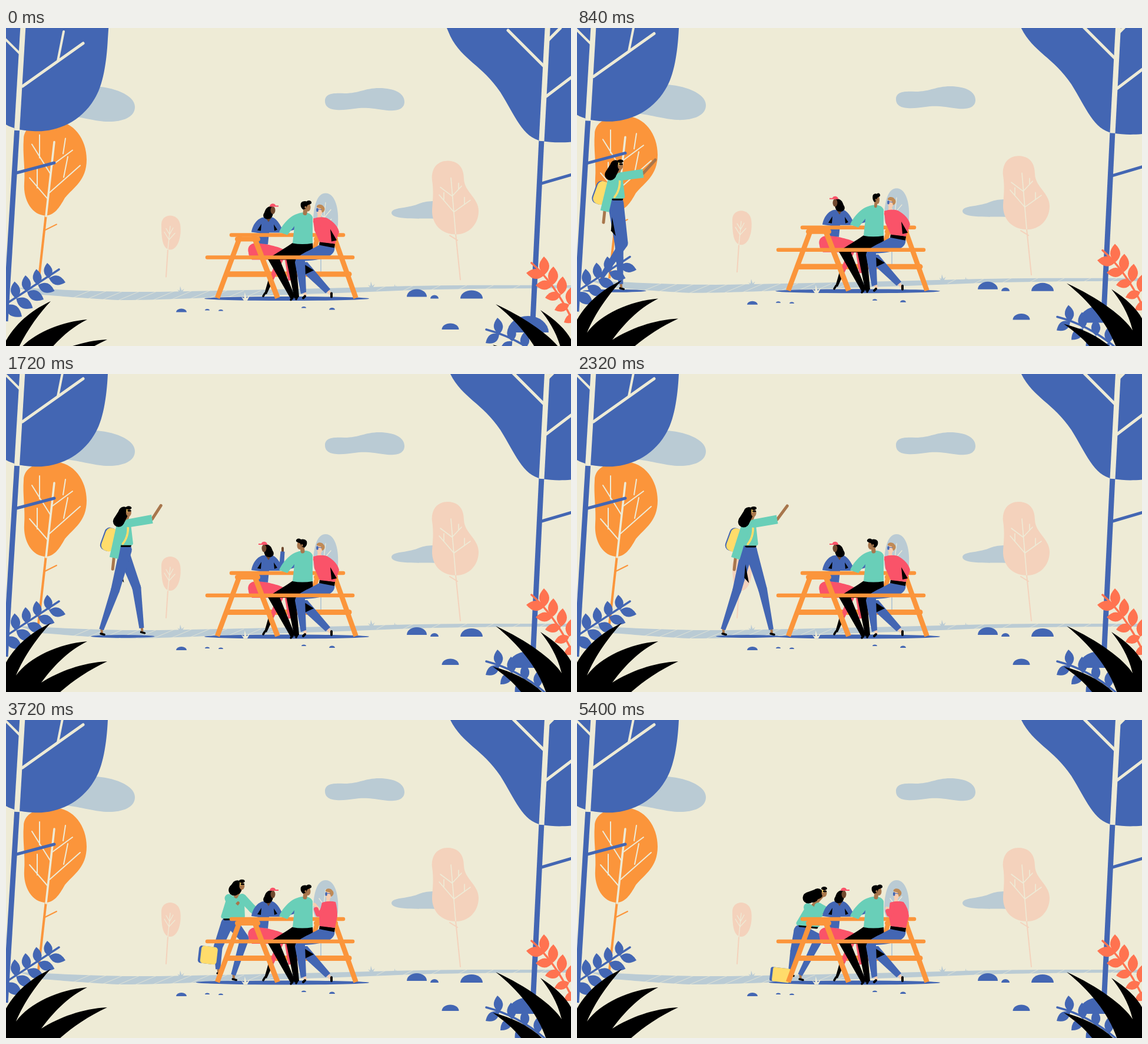
Animation of 960 by 540 pixels, one loop 5440 ms. Source, as an HTML page with a canvas:

```html
<!DOCTYPE html>
<html lang="en">
<head>
<meta charset="utf-8">
<title>Picnic table</title>
<style>
html, body { margin: 0; width: 100%; height: 100%; overflow: hidden; background: #eeebd6; }
canvas { display: block; }
</style>
</head>
<body>
<canvas id="stage" width="960" height="540"></canvas>
<script>
const g = document.getElementById('stage').getContext('2d');
const LOOP = 5440, PI = Math.PI;
const CREAM = '#eeebd6', BLUE = '#4366b3', SKY = '#bacbd4', ORANGE = '#fb953b', PEACH = '#f4d2bc',
  TEAL = '#69cfb8', RED = '#fa5369', CORAL = '#ff7350', YELLOW = '#ffdc6b', BLACK = '#000',
  TAN = '#a8764c', BROWN = '#70492f', PALE = '#f8cdb0', HAIR = '#c08a55';
let t = 0;

const mix = (a, b, k) => a + (b - a) * k;
const mixPt = (p, q, k) => [mix(p[0], q[0], k), mix(p[1], q[1], k)];
const ramp = (a, b) => { // smooth 0..1 between two times
  const k = Math.min(1, Math.max(0, (t - a) / (b - a)));
  return k * k * (3 - 2 * k);
};

function shape(d, color) {
  g.fillStyle = color;
  g.fill(new Path2D(d));
}
function line(d, color, width, cap = 'round') {
  g.strokeStyle = color;
  g.lineWidth = width;
  g.lineCap = cap;
  g.lineJoin = 'round';
  g.stroke(new Path2D(d));
}
function oval(x, y, rx, ry, color) {
  g.fillStyle = color;
  g.beginPath();
  g.ellipse(x, y, rx, ry, 0, 0, 2 * PI);
  g.fill();
}
function dome(x, y, rx, ry) {
  g.fillStyle = BLUE;
  g.beginPath();
  g.ellipse(x, y, rx, ry, 0, PI, 2 * PI);
  g.fill();
}
function limb([x1, y1], [x2, y2], w1, w2, color) { // tapered, round at its start
  const d = Math.hypot(x2 - x1, y2 - y1) || 1, nx = (y1 - y2) / d / 2, ny = (x2 - x1) / d / 2;
  oval(x1, y1, w1 / 2, w1 / 2, color);
  shape(`M${x1 + nx * w1} ${y1 + ny * w1}L${x2 + nx * w2} ${y2 + ny * w2}
    L${x2 - nx * w2} ${y2 - ny * w2}L${x1 - nx * w1} ${y1 - ny * w1}Z`, color);
}
function leaf(x1, y1, x2, y2, color) {
  const mx = mix(x1, x2, .45), my = mix(y1, y2, .45), nx = (y2 - y1) * .55, ny = (x1 - x2) * .55;
  shape(`M${x1} ${y1}Q${mx + nx} ${my + ny} ${x2} ${y2}Q${mx - nx} ${my - ny} ${x1} ${y1}Z`, color);
}
function layer(shift, power, draw) { // camera settles upwards, nearer layers move further
  g.save();
  g.translate(0, shift * Math.max(0, 1 - t / 1800) ** power);
  draw();
  g.restore();
}
function tuft(x, y, size, color) {
  for (const [dx, dy] of [[-.8, .7], [-.15, 1.5], [.8, .9]])
    shape(`M${x - size * .35} ${y}L${x + dx * size} ${y - dy * size}L${x + size * .35} ${y}Z`, color);
}

function clouds() {
  shape('M100 145L150 96C180 97 219 110 219 131C219 150 195 157 170 156C148 155 130 148 100 145Z', SKY);
  shape('M542 121C542 108 556 107 575 108C600 108 610 99 634 99C660 99 677 108 677 122C677 135 665 138 648 137C625 134 610 131 592 134C570 137 542 140 542 121Z', SKY);
  shape('M655 311C656 301 680 304 700 296C715 290 725 291 735 291V321C700 320 655 323 655 311Z', SKY);
}

function path() {
  shape('M20 428C80 430 150 436 260 435C400 432 520 430 620 427C740 423 850 424 960 424V429C850 429 760 430 690 432C600 436 480 440 380 443C300 447 250 449 190 449C130 446 90 442 60 440Z', SKY);
  for (let i = 0; i < 12; i++) {
    const x = 105 + i * 29;
    line(`M${x} 449L${x + 38} 433`, CREAM, .7);
  }
  for (let x = 630; x < 950; x += 45) line(`M${x} 433l18 -9`, CREAM, .7);
  tuft(297, 436, 7, SKY);
  tuft(621, 428, 7, SKY);
  tuft(661, 428, 4, SKY);
}

function farTrees() {
  shape('M264 325C264 306 292 304 296 325C299 345 292 368 279 368C266 367 264 350 264 325Z', PEACH);
  line('M275 368L272 414', PEACH, 2);
  line('M279 328L275 368M269 338L277 351L287 340M272 332L278 342L284 331', CREAM, 1.3);

  shape('M724 250C722 228 735 216 752 217C770 218 778 230 778 248C779 270 803 280 803 302C803 325 786 342 765 342C740 342 723 325 724 300C725 285 727 270 724 250Z', PEACH);
  line('M764 341L772 419M767 352L754 344', PEACH, 2);
  line('M756 246L764 341M736 275L761 304L789 284M738 262L758 277L774 260M744 283V271M779 291V279M769 265V255', CREAM, 1.6);

  shape('M543 272C560 272 566 300 564 325C562 350 520 350 522 318C523 295 528 272 543 272Z', SKY);
  line('M535 345V408', SKY, 2);
  line('M543 288L537 340M532 303L540 314L552 300M529 318L539 328L553 316', CREAM, 1.3);

  shape('M30 180C30 158 55 148 82 149C115 150 137 180 137 215C137 250 115 262 100 280C90 298 82 309 68 310C45 310 29 285 31 255C33 230 28 205 30 180Z', ORANGE);
  line('M68 308L55 425', ORANGE, 4, 'butt');
  line('M66 335L86 325', ORANGE, 2);
  line('M82 185L68 311', CREAM, 3.5);
  line('M44 189L76 240M57 173V212M101 179L97 205M113 199L79 224M126 225L74 271M105 210L98 245M40 246L71 282M53 228V263', CREAM, 2);
}

function leftTree() {
  line('M19 150L-1 480', BLUE, 9, 'butt');
  line('M18 228L82 211', BLUE, 5);
  shape('M0 -30H175L173 0C171 40 165 80 150 103C125 145 80 160 45 157C25 156 10 152 0 146Z', BLUE);
  line('M29.5 -30L18.5 156', CREAM, 9, 'butt');
  line('M-8 -6L24 26M98 -12L88 38', CREAM, 4);
  line('M131 8L28 81', CREAM, 5);
}

function rightTree() {
  line('M910 175L895 485', BLUE, 9, 'butt');
  line('M910 250L968 233', BLUE, 5);
  shape('M742 -30L755 0C775 40 810 50 840 95C865 135 878 172 910 178C930 181 945 181 965 179V-30Z', BLUE);
  line('M921 -30L910 178', CREAM, 9, 'butt');
  line('M853 -10L914 51M968 64L918 102M942 -14L918 10', CREAM, 5);
}

function rocks() {
  for (const [x, y, rx, ry] of [[698, 443, 17, 13], [728, 446, 7, 6], [791, 446, 19, 14],
    [298, 469, 9, 6], [342, 466, 4, 2.5], [365, 467, 4, 2.5], [506, 462, 4, 2.5], [554, 465, 5, 3.5]]) dome(x, y, rx, ry);
}
function nearRocks() {
  dome(755, 494, 14.5, 10.5);
  dome(887, 499, 35, 28);
}

function plants() {
  line('M90 386L-5 448', BLUE, 3.5);
  for (let i = 0; i < 5; i++) {
    const x = 73 - i * 18.5, y = 401 + i * 11.5;
    leaf(x, y, x - 3, y - 26 - i, BLUE);
    leaf(x, y, x + 28, y + 7 + i * 3, BLUE);
  }
  line('M893 375Q935 412 966 480', CORAL, 3.5);
  for (let i = 0; i < 5; i++) {
    const x = 915 + i * 14, y = 395 + i * 17;
    leaf(x, y, x - 1 + i * 2, y - 31, CORAL);
    leaf(x, y, x - 31 + i * 2, y - 3 + i * 4, CORAL);
  }
  line('M816 488Q870 502 915 540', BLUE, 3.5);
  for (let i = 0; i < 4; i++) {
    const x = 838 + i * 22, y = 496 + i * 12;
    leaf(x, y, x - 3 + i, y - 28, BLUE);
    leaf(x, y, x - 23 + i * 3, y + 15 + i * 4, BLUE);
  }
}

function blades() {
  shape('M0 490C20 455 50 435 76 423C55 445 30 480 17 512C40 480 90 458 138 454C110 468 85 490 60 524C90 505 130 490 172 488C140 503 115 520 92 540H0Z', BLACK);
  shape('M832 428C885 452 930 485 944 508C937 478 922 455 908 438C935 455 955 475 962 492V545H919C905 500 872 460 832 428Z', BLACK);
  shape('M827 497C860 505 890 520 912 541H876C862 523 845 510 827 497Z', BLACK);
}

// Joints: head, shoulders, hems, back arm, front arm, back leg, front leg, bag, hair end, face, bag size, [bag tilt, sleeve]
const STAND = [[358, 251], [349, 269], [382, 269], [353, 309], [388, 301], [334, 300], [343, 275], [398, 306], [395, 334],
  [369, 318], [339, 371], [354, 417], [386, 316], [393, 372], [402, 433], [340, 326], [376, 260], [359, 255], [23, 42], [.1, .65]];
const SIT = [[409, 295], [392, 318], [410, 317], [376, 345], [409, 348], [410, 330], [418, 327], [428, 327], [446, 333],
  [379, 358], [370, 392], [363, 426], [384, 360], [411, 371], [379, 433], [347, 433], [393, 302], [420, 294], [30, 24], [.12, .75]];

function stride(p) { // foot offset: planted half, then swung forward
  if (p < .5) return [41 - 164 * p, 0];
  const u = p * 2 - 1;
  return [-41 + 82 * u ** 1.4, -12 * Math.sin(PI * u)];
}
function knee(hip, foot, lift) {
  const dx = foot[0] - hip[0], dy = foot[1] - hip[1], d = Math.hypot(dx, dy), bend = 3 + 2 * lift;
  return [hip[0] + dx / 2 + dy / d * bend, hip[1] + dy / 2 - dx / d * bend];
}
function walkPose() {
  const x = 289 + (t - 2320) * .153;
  const p = ((t - 1200) / 1120 + 2) % 1, y = 293 - 3 * Math.abs(Math.sin(2 * PI * p));
  const at = (dx, dy) => [x + dx, y + dy];
  const leg = (hip, q) => {
    const [dx, dy] = stride(q % 1), foot = [x + dx, 434 + dy];
    return [hip, knee(hip, foot, -dy), foot];
  };
  const up = ramp(520, 900), swing = 5 * Math.sin(4 * PI * p) * up, arm = 3 * Math.cos(2 * PI * p);
  return [at(3, -58), at(-2, -38), at(11, -39), at(-4, -5), at(15, -5), at(-17 - arm, 20), at(-19 - arm, 39),
    mixPt(at(30, -20), at(51, -46), up), mixPt(at(51, -41), at(68 + swing, -69), up),
    ...leg(at(0, 6), p + .5), ...leg(at(6, 6), p),
    at(-21, -11), at(-6, -42), at(11, -57), [22, 40], [.35, 0]];
}

function leg(hip, kn, foot) {
  limb(hip, kn, 21, 15, BLUE);
  shin(kn, foot);
}
function shin(kn, foot) {
  const [x, y] = foot;
  limb([x, y - 4], [x + 1, y + 6], 4, 4, TAN);
  line(`M${x - 1} ${y + 7}L${x + 5} ${y + 8.5}`, BLACK, 3.5);
  limb(kn, foot, 15, 8, BLUE);
}
function sleeve(sh, el, hand, cover, w) {
  line(`M${el}L${hand}`, TAN, 5);
  limb(sh, el, 14, w, TEAL);
  if (cover > .05) limb(el, mixPt(el, hand, cover), w, 11, TEAL);
}

function newcomer([head, sB, sF, hB, hF, eB, handB, eF, handF, hipB, kB, fB, hipF, kF, fF, bag, lobe, face, size, [tilt, cover]]) {
  const walking = cover < .3;
  if (!walking && t < 3650) line(`M${handB}L${bag[0]} ${bag[1] - 15}`, YELLOW, 4);
  leg(hipB, kB, fB);
  if (walking) shape(`M${hipB[0] - 3} ${hipB[1] + 24}l6 32l-8 -9Z`, BLACK);
  leg(hipF, kF, fF);
  g.save();
  g.translate(...bag);
  g.rotate(tilt);
  const [w, h] = size;
  for (const [dx, c] of [[walking ? -2 : -4, BLUE], [0, YELLOW]]) {
    g.fillStyle = c;
    g.beginPath();
    g.roundRect(dx - w / 2, -h / 2, w, h, mix(9, 3, ramp(3400, 3900)));
    g.fill();
  }
  g.restore();
  line(`M${hB[0] + 3} ${hB[1] + 4}L${hF[0] - 2} ${hF[1] + 4}`, BLACK, 5);
  const body = `M${sB}L${sF}L${hF}L${hB}Z`;
  shape(body, TEAL);
  line(body, TEAL, 7);
  line(`M${face}L${(sB[0] + sF[0]) / 2 + 1} ${(sB[1] + sF[1]) / 2 - 3}`, TAN, 7);
  if (walking) line(`M${sF[0] - 2} ${sF[1] - 3}Q${sF[0] + 2} ${sF[1] + 20} ${hB[0] + 5} ${hB[1] + 1}`, YELLOW, 3.5);
  const cuff = mix(15, 13, cover);
  sleeve(sB, eB, handB, cover, cuff);
  sleeve(sF, eF, handF, cover, cuff);
  limb(lobe, head, 19, 17, BLACK);
  oval(head[0], head[1], 9, 9, BLACK);
  if (!walking) oval(mix(head[0], lobe[0], .55), lobe[1] - 1, 10, 9, BLACK);
  oval(face[0], face[1], 4.5, 6.5, TAN);
  line(`M${face[0] - 3} ${face[1] - 8}l1 6`, YELLOW, 2.5);
  line(`M${face[0] - 1} ${face[1] - 3}h4`, BLACK, 2.5);
  oval(face[0], face[1] - 8, 5, 3, BLACK);
}

function flipped(x, y, turn, draw) { // turn runs from 1 (right) to -1 (left)
  g.save();
  g.translate(x, y);
  g.scale((turn < 0 ? -1 : 1) * Math.max(.7, Math.abs(turn)), 1);
  draw();
  g.restore();
}

function woman() {
  limb([467, 376], [449, 418], 11, 7, RED);
  limb([478, 372], [484, 415], 11, 9, RED);
  limb([450, 414], [441, 438], 8, 4, BLACK);
  line('M440 437L437 442', BLACK, 3.5);
  shape('M412 368C408 352 425 349 440 353C460 358 478 361 481 373L478 380H418C414 376 412 372 412 368Z', RED);
  shape('M417 333C419 321 427 309 438 308L453 308C462 312 468 324 472 334H447L445 354L428 352L431 335Z', BLUE);
  shape('M427 330L434 319L433 331ZM455 320L461 329L456 331Z', BLACK);
  shape('M440 307H452L446 316Z', BROWN);
  const up = ramp(850, 1080) - ramp(1700, 1950);
  if (up > .02) {
    const y = mix(328, 301, up);
    line(`M470 ${y}v-6`, BROWN, 4);
    limb([468, 329], [470, y], 8, 7, BLUE);
  }
  flipped(446, 297, 1 - 2 * (ramp(300, 470) - ramp(2650, 2850)), () => {
    line('M2 2L0 12', BROWN, 6);
    shape('M7 -8C-4 -8 -5 -2 -7 3C-11 8 -8 14 -2 14C6 14 7 9 8 3Z', BLACK);
    oval(7.5, -1, 4, 6.5, BROWN);
    shape('M2 -7C2 -13 11 -14 12 -9L17 -9V-7Z', RED);
  });
}

function manLegs() {
  shape('M489 350H521L522 380H446C445 376 465 367 489 350Z', BLACK);
  shape('M445 379L464 377L491 443L484 447Z', BLACK);
  shape('M476 378H492L498 443L490 446Z', BLACK);
  line('M487 445L484 448M495 443L493 447', BLACK, 3.5);
}
function manBody() {
  shape('M486 317L497 313L494 328L483 331Z', BLUE);
  shape('M498 301C508 298 519 300 521 308L521 352Q503 355 487 352L490 323L478 338L464 333C470 320 482 305 498 301Z', TEAL);
  flipped(506, 289, 1 - 2 * (ramp(760, 950) - ramp(2600, 2800)), () => {
    line('M3 4L2 12', TAN, 7);
    oval(7, 2, 4.5, 7, TAN);
    shape('M-5 -5C-3 -9 3 -9 5 -8C8 -11 14 -9 13 -5C11 -2 7 -3 6 -1L4 4L-1 6C-5 3 -6 -1 -5 -5Z', BLACK);
    oval(3, 2, 1.6, 2, TAN);
  });
}

function friend() {
  const lean = 1 - ramp(2650, 2900) + .35 * ramp(4700, 5050);
  const x = 549 - 15 * lean;
  limb([506, 432], [509, 441], 5, 5, PALE);
  limb([545, 431], [552, 439], 5, 5, PALE);
  line('M508 442L505 445M553 437L553 443', BLACK, 4);
  shape('M503 384H512L551 430L543 437L506 403Z', BLUE);
  shape('M507 388L523 398L508 405Z', BLACK);
  shape('M532 355L558 357C561 372 545 380 508 382L510 435L501 438L491 385C492 372 512 367 532 355Z', BLUE);
  shape('M533 349L559 353L558 360L532 355Z', BLACK);
  const hand = mixPt([524, 313], [530, 331], lean);
  line(`M${hand}L531 321`, PALE, 5);
  line(`M${x - 1} 297L${x - 2} 309`, PALE, 6);
  shape(`M${x - 12} 310Q${x} 306 ${x + 11} 309Q563 319 ${mix(563, 566, lean)} 333L559 353L533 350L${532 - 8 * lean} 330Z`, RED);
  line(`M${x - 8} 315Q535 331 530 330L${mixPt([530, 330], hand, .5)}`, RED, 8);
  if (lean > .5) shape('M551 328L562 347L553 349Z', BLACK);
  oval(x - 1, 297, 5, 7, PALE);
  shape(`M${x - 6} 291C${x - 7} 285 ${x + 3} 285 ${x + 5} 289C${x + 10} 293 ${x + 7} 299 ${x + 3} 300L${x + 1} 293Z`, HAIR);
  line(`M${x - 5} 294v3`, BLUE, 3.5);
  line(`M${x - 4} 294L${x + 2} 295`, BLUE, 1);
}

function tableScene() {
  rocks();
  oval(477, 446, 140, 3.5, BLUE);
  const stand = ramp(2440, 2950), sit = ramp(3320, 3960);
  const pose = walkPose().map((p, i) => mixPt(mixPt(p, STAND[i], stand), SIT[i], sit));
  oval(pose[9][0] + 1, 445.5, 54, 2.5, BLUE);

  line('M376 404.5H583', ORANGE, 9);
  line('M530 341L520 376', ORANGE, 8, 'butt');
  newcomer(pose);
  woman();
  line('M398 340L359 445', ORANGE, 8.5, 'butt');
  line('M421 340L461.5 445', ORANGE, 9, 'butt');
  line('M557 340L594.5 445', ORANGE, 8.5, 'butt');
  line('M393 345H428M527 345H560', ORANGE, 8);
  line('M383 338H573', ORANGE, 6.5);
  line('M376 404.5H440', ORANGE, 9);
  manLegs();
  friend();
  manBody();
  line('M342 376H589', ORANGE, 6.5);
  if (stand > .5 && sit < .4) shin(pose[10], pose[11]);
  tuft(407, 449, 9, CREAM);
}

function frame(now) {
  t = now % LOOP;
  g.fillStyle = CREAM;
  g.fillRect(0, 0, 960, 540);
  layer(3, 6, clouds);
  layer(13, 4.4, path);
  layer(8.5, 6, farTrees);
  layer(18, 4, leftTree);
  layer(14, 5, rightTree);
  layer(13.5, 4.4, tableScene);
  layer(18, 4, nearRocks);
  layer(24, 3.6, plants);
  layer(41, 3.2, blades);
  requestAnimationFrame(frame);
}
requestAnimationFrame(frame);
</script>
</body>
</html>
```
